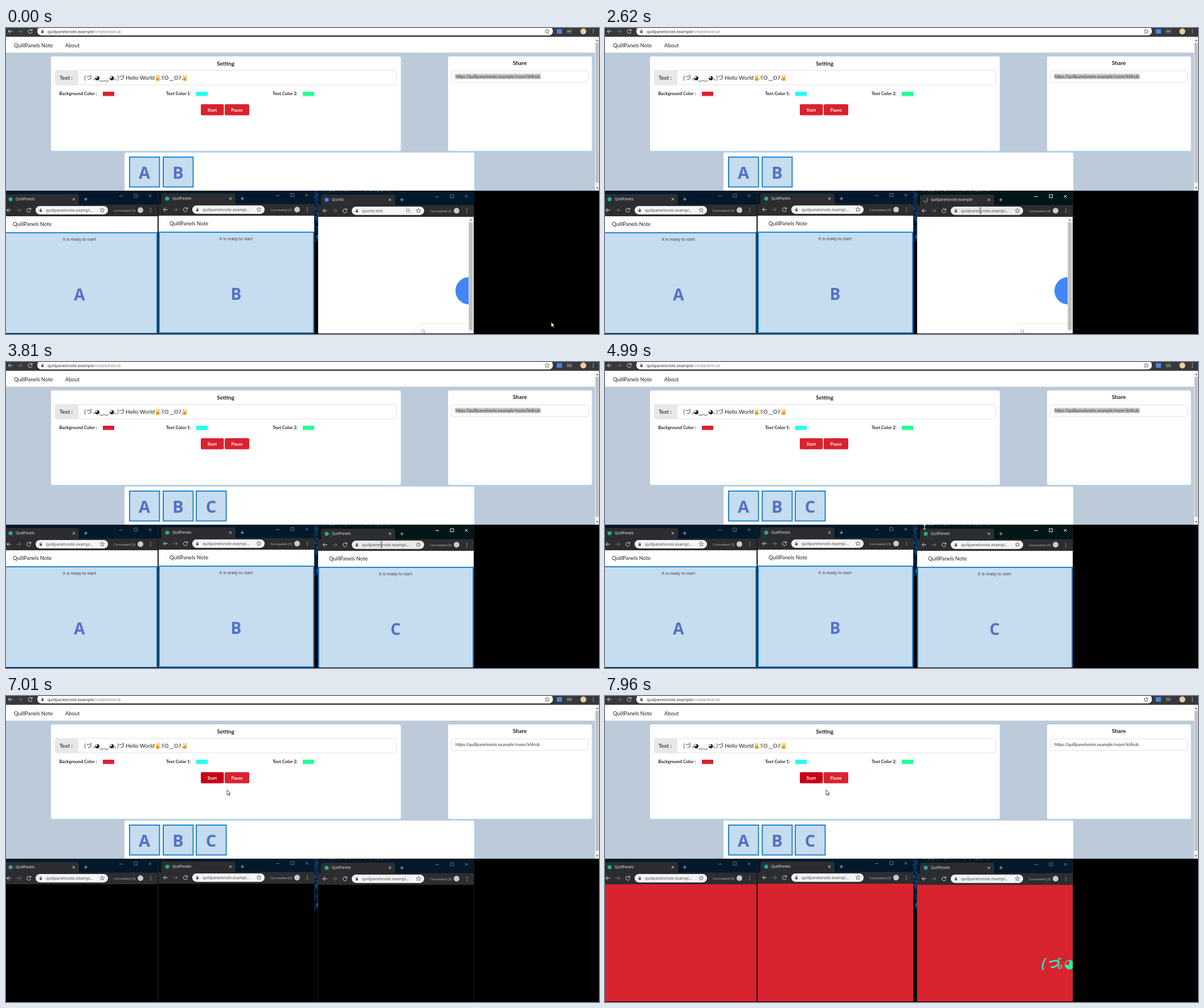
An HTML page that plays this animation: 1041 by 538 pixels, repeating every 8 s.

```html
<!DOCTYPE html>
<html lang="en">
<head>
<meta charset="utf-8">
<title>Text across screens</title>
<style>
html, body { margin: 0; width: 100%; height: 100%; overflow: hidden; background: #000; }
svg { display: block; width: 100vw; height: 100vh; font-family: 'Open Sans', 'Noto Sans', sans-serif; }
text { white-space: pre; }
.l { font-family: Lato, sans-serif; }
.k { font-family: 'Noto Sans CJK JP', 'Noto Sans CJK', 'DejaVu Sans', sans-serif; }
.d { font-family: 'DejaVu Sans', sans-serif; }
.b { font-weight: 700; }
.m { text-anchor: middle; }
</style>
</head>
<body>
<svg id="stage" viewBox="0 0 1041 538" preserveAspectRatio="none"></svg>
<script>
const LOOP = 8000;
const BLUE = '#2185d0', PALE = '#c6dcef', PAGE = '#bccada', RED = '#d9232f', DARK = '#2c2d30';
const APP = 'QuillPanels', NAV = APP + ' Note', HOST = 'quillpanelsnote.example', SHORT = 'quillpanelsnote.exampl...';
const $ = id => document.getElementById(id);

const rect = (x, y, w, h, fill, more = '') =>
  `<rect x="${x}" y="${y}" width="${w}" height="${h}" fill="${fill}" ${more}/>`;
const circle = (x, y, r, fill, more = '') => `<circle cx="${x}" cy="${y}" r="${r}" fill="${fill}" ${more}/>`;
const text = (x, y, s, size, cls = '', fill = '#222', more = '') =>
  `<text x="${x}" y="${y}" font-size="${size}" class="${cls}" fill="${fill}" ${more}>${s}</text>`;
const line = (x, y, d, color, w = 1, more = '') =>
  `<path transform="translate(${x} ${y})" d="${d}" fill="none" stroke="${color}" stroke-width="${w}" ${more}/>`;
const group = (id, body, more = '') => `<g id="${id}" ${more}>${body}</g>`;
const clip = (id, body) => `<g clip-path="url(#${id})">${body}</g>`;

const icons = {
  back: 'M4 0H-3.5M0-3.5L-3.5 0 0 3.5',
  next: 'M-4 0H3.5M0-3.5L3.5 0 0 3.5',
  reload: 'M2.8-2A3.5 3.5 0 1 0 3.4 1M3.5-4V-1.2H.7',
  star: 'M0-4L1.1-1.2 4-1.1 1.8.8 2.5 3.6 0 2-2.5 3.6-1.8.8-4-1.1-1.1-1.2Z',
  close: 'M-2.2-2.2L2.2 2.2M2.2-2.2L-2.2 2.2',
  plus: 'M-3 0H3M0-3V3',
  lens: 'M1.5 1.5L4 4M2-.5A2.6 2.6 0 1 1-3.2-.5A2.6 2.6 0 1 1 2-.5'
};
const lock = (x, y, c) => rect(x - 2, y - .8, 4, 3.6, c) + line(x, y, 'M-1.3-.5V-1.7A1.3 1.3 0 0 1 1.3-1.7V-.5', c, .8);
const dots = (x, y, c) => [-3, 0, 3].map(d => circle(x, y + d, .8, c)).join('');
const nav = (x, y) => line(x, y, icons.back, '#ddd') + line(x + 17.5, y, icons.next, '#77787b') +
  line(x + 35, y, icons.reload, '#ddd');
const card = (x, y, w, h) => rect(x, y, w, h, '#b0d3ef', 'rx="3" transform="translate(2 2)"') + rect(x, y, w, h, '#fff', 'rx="3"');

function tile(i) {
  const x = Math.round(217 + i * 58.6);
  return group('tile' + i, rect(x, 227, 52.5, 52.5, PALE, `stroke="${BLUE}" stroke-width="2"`) +
    text(x + 26, 265, 'ABC'[i], 29, 'b m', '#5470c4'));
}

function swatch(x, color) {
  return rect(x - 3, 109.5, 26, 12, '#fff', 'stroke="#e6e6e6" stroke-width=".7"') + rect(x, 112, 20, 7.5, color);
}

// Two raised fingers over a round palm.
const victory = x => line(x + 4.3, 89, 'M-1 0L-2-5.5M1 0L2.2-5.5', '#f2b235', 1.8, 'stroke-linecap="round"') +
  rect(x + 1, 87, 6.8, 6, '#f2b235', 'rx="2.6"') + line(x + 4.3, 89, 'M-2 .5H1.5M-2 2H1', '#a5701c', .6);

function message() {
  return text('137 141 153 156 164 172.5 181.5 190 195 198', 91, '(づ｡◕‿‿◕｡)づ', 10, 'k') +
    text(210, 91, 'Hello World', 9.7, 'l') + victory(262) +
    text('270.5 273 278 287 295 303 308', 91, '.ʕʘ‿ʘʔ.', 9.5, 'd') + victory(309.5);
}

function controlPage() {
  return rect(0, 0, 1041, 286, PAGE) +
    rect(0, 0, 1041, 16, '#37383b') + rect(55, -2, 905, 15, '#fff', 'rx="7"') +
    nav(7.5, 6) + lock(64, 6, '#555') +
    text(73, 8.7, `${HOST}<tspan fill="#777">/create/kt4rub</tspan>`, 7.1, '', '#222') +
    line(950, 6, icons.star, '#555', .8) + rect(967, 2, 9, 8, '#4a86e0') +
    rect(984, 2, 10, 8, '#505155', 'rx="1"') + [986.5, 989, 991.5].map(x => circle(x, 6, .8, '#eee')).join('') +
    circle(1013.5, 6, 5.2, '#e8cfa0') + dots(1031, 6, '#ddd') +
    rect(0, 15.5, 1034, 28, '#fff') + rect(0, 43, 1034, .7, '#d5d8dc') +
    text(14, 34, NAV, 9.3, 'l') + text(104, 34, 'About', 9.3, 'l') +
    rect(1034, 15.5, 7, 271, '#f1f1f1') + rect(1035, 26, 5.5, 246, '#c1c1c1') +
    '<path d="M1036 23h4l-2-2.5zM1036 280h4l-2 2.5z" fill="#505050"/>' +
    card(79, 50, 614, 166) + card(776, 50, 252.5, 166) + card(208, 219, 614, 80) +
    text(385.5, 66, 'Setting', 9.8, 'l b m') +
    rect(86.5, 74.5, 599, 25.5, '#fff', 'rx="2.5" stroke="#d9dadb" stroke-width=".8"') +
    rect(86, 74, 41, 26.5, '#e8e8e8', 'rx="2.5"') + text(94, 91, 'Text :', 9.6, 'l b', '#444') + message() +
    text(93.5, 117.5, 'Background Color :', 7.8, 'l b') + swatch(170, RED) +
    text(281, 117.5, 'Text Color 1:', 7.8, 'l b') + swatch(334, '#22fff0') +
    text(468, 117.5, 'Text Color 2:', 7.8, 'l b') + swatch(521, '#22ff99') +
    rect(342, 134, 40.5, 19.5, RED, 'rx="2.2" id="start"') + rect(384, 134, 43, 19.5, RED, 'rx="2.2"') +
    text(362, 146.7, 'Start', 7.6, 'l b m', '#fff') + text(405.5, 146.7, 'Pause', 7.6, 'l b m', '#fff') +
    text(902, 65, 'Share', 9.8, 'l b m') +
    rect(781.5, 75.5, 241, 20, '#fff', 'rx="2.5" stroke="#d9dadb" stroke-width=".8"') +
    rect(789, 80.5, 150, 9.5, '#c8c8c8', 'id="picked"') +
    text(789, 88, `https://${HOST}/room/kt4rub`, 7.5, 'l', '#333') +
    [0, 1, 2].map(tile).join('');
}

// Browser window; its coordinates are those of the leftmost one.
function browser(i, dx, dy, pages, extra = '') {
  const full = color => rect(-7, 331, 273, 210, color);
  const header = rect(-7, 331, 273, 27.5, '#fff') + text(12, 347.5, NAV, 9.3, 'l');
  const ready = header + rect(-6, 360, 271, 177, PALE, `stroke="${BLUE}" stroke-width="2"`) +
    text(129, 373.5, 'It is ready to start', 7.2, 'm', '#333') +
    text(129, 479, 'ABC'[i], 28, 'b m', '#5470c4');
  return `<g transform="translate(${dx} ${dy})">` +
    rect(-7, 287, 273, 260, '#000', 'stroke="#3a4148" stroke-width=".8"') +
    rect(-7, 287, 273, 25, '#03192b', `id="bar${i}"`) +
    group('buttons' + i, line(202, 295, 'M-3 .5H3', 'inherit') + rect(225, 292, 5.5, 5.5, 'none') +
      line(253, 295, icons.close, 'inherit'), 'stroke="#6e7b86" stroke-width=".9"') +
    rect(-2, 292, 130, 24, DARK, 'rx="4"') + rect(-7, 310.5, 273, 20.5, DARK) +
    circle(8, 301, 3.6, '#25a99b', `id="fav${i}"`) + text(17, 303.3, APP, 6.4, '', '#f0f0f0', `id="title${i}"`) +
    line(119, 301, icons.close, '#ddd', .9) + line(140, 301, icons.plus, '#ccc', .9) +
    nav(5, 320.3) + rect(52, 313, 127, 14.7, '#f4f5f6', `rx="7.3" id="pill${i}"`) + lock(61, 320.5, '#555') +
    rect(69, 315, 10, 11, '#1a74cf', `id="sel${i}" display="none"`) +
    text(70, 323, SHORT, 7.1, '', '#444', `id="url${i}"`) + line(169, 320, icons.star, '#555', .8) +
    text(189, 322.7, 'Concealed (3)', 6.1, '', '#bbb') + circle(236, 320.3, 5, '#c9cacc') + dots(254, 320.3, '#ccc') +
    full('#fff') + (pages ? pages(header) : '') +
    group('ready' + i, ready) + group('black' + i, full('#000')) + group('red' + i, full(RED)) + extra + '</g>';
}

function visitorPages(header) {
  const bar = (y, w) => rect(9, y, w, 5.3, 'url(#bone)', 'rx="2.6"');
  const search = circle(258, 461, 24, '#4285f4') +
    rect(162, 519, 150, 32, '#fff', 'rx="15" stroke="#dcdfe3" stroke-width=".8"') +
    line(178, 532.5, icons.lens, '#8a8f94', .9) +
    rect(257, 331, 9, 210, '#f1f1f1') + rect(257.5, 341, 7, 189, '#c1c1c1') +
    '<path d="M259 337.5h4l-2-2.5z" fill="#666"/>';
  const loading = rect(-7, 331, 273, 210, PAGE) + header + card(.5, 365, 257.5, 70) +
    text(129, 375, 'Loading', 9.7, 'l b m') + bar(389, 192) + bar(405.3, 240) + bar(421.7, 240);
  return group('search', clip('pageClip', search)) + group('loading', loading);
}

function visitorExtra() {
  const row = (y, s, c) => circle(57, y - 2.5, 2.6, 'none', 'stroke="#777" stroke-width=".7"') +
    clip('urlClip', text(70, y, s, 7.1, '', c));
  const drop = rect(47, 310.5, 137, 75.5, '#fff', 'rx="7" stroke="#cfd1d4" stroke-width=".5"') + lock(61, 320.5, '#555') +
    clip('urlClip', text(161, 323, HOST + '/room/kt4rub', 7.1, '', '#222', 'text-anchor="end"')) +
    line(169, 320, icons.star, '#555', .8) + rect(47, 332, 137, 25, '#e8eaed') +
    row(347, HOST + '/room', '#1a67c9') + row(372, HOST, '#333');
  const marquee = text('-1 11 29.5 41', 477, '(づ｡◕', 21.5, 'k b', 'url(#ink)', 'font-style="italic"');
  return line(151, 320, icons.lens, '#555', .8, 'id="lens"') + group('drop', drop) +
    clip('pageClip', group('scroll', marquee));
}

// Specks of the wallpaper that show between the windows.
function wallpaper() {
  let seed = 7, out = rect(541, 286, 7, 92, 'url(#night)');
  const rnd = () => (seed = seed * 16807 % 2147483647) / 2147483647;
  for (let i = 0; i < 70; i++)
    out += rect(541 + rnd() * 6, 289 + rnd() * 86, 1, 1 + rnd() * 3, `hsl(208 80% ${15 + rnd() * 35}%)`);
  for (let i = 0; i < 60; i++)
    out += rect(555 + rnd() * 120, 286.5 + rnd(), 1.5, 1, `hsl(205 60% ${20 + rnd() * 35}%)`);
  return out;
}

const gradient = (id, more, a, b) =>
  `<linearGradient id="${id}" ${more}><stop stop-color="${a}"/><stop offset="1" stop-color="${b}"/></linearGradient>`;
const clipBox = (id, ...box) => `<clipPath id="${id}">${rect(...box, '#000')}</clipPath>`;
const pointers = {
  arrow: '<path d="M0 0V9L2.1 7.1 3.5 10.2 4.9 9.6 3.5 6.5H6.3Z" fill="#fff" stroke="#000" stroke-width=".7"/>',
  beam: line(0, 0, 'M-1.8-4.8H1.8M0-4.8V4.8M-1.8 4.8H1.8', '#222', .8),
  size: line(0, 0, 'M0-4V4M-2-2.5L0-4.7 2-2.5M-2 2.5L0 4.7 2 2.5', '#fff', 1),
  hand: '<path d="M0 0Q1.5-1 1.6 1V4L5.5 5V8L4.5 11H0L-2.8 6.5-1.6 6 0 7Z" fill="#fff" stroke="#000" stroke-width=".7"/>'
};

$('stage').innerHTML = '<defs>' +
  gradient('bone', '', '#dcdcdc', '#f1f1f1') +
  gradient('night', 'x2="0" y2="1"', '#06234a', '#000814') +
  gradient('ink', 'gradientUnits="userSpaceOnUse" x1="0" x2="60"', '#22f6e2', '#22ff99') +
  clipBox('urlClip', 70, 311, 92, 80) + clipBox('pageClip', -7, 331, 273, 210) +
  clipBox('topClip', 0, 0, 1041, 286) + '</defs>' +
  rect(0, 0, 1041, 538, '#000') + wallpaper() +
  browser(0, 0, 0) + browser(1, 275, -1) + browser(2, 555, 1, visitorPages, visitorExtra()) +
  rect(0, 537, 1041, 1, '#000') + clip('topClip', controlPage()) +
  group('pointer', Object.keys(pointers).map(k => group(k, pointers[k])).join(''));

const path = [
  [0, 957, 517, 'arrow'], [60, 957, 517, 'arrow'], [420, 690, 321, 'beam'], [1170, 690, 321, 'beam'],
  [1250, 659, 321, 'beam'], [3720, 659, 321, 'beam'], [3765, 660, 321, 'beam'], [3810, 659, 321, 'beam'],
  [4170, 659, 321, 'arrow'], [4680, 613, 344, 'arrow'], [4920, 613, 344, 'arrow'], [4990, 561, 290, 'size'],
  [5075, 561, 290, 'arrow'], [5130, 326, 142, 'arrow'], [5370, 326, 142, 'arrow'], [5600, 358, 146, 'hand'],
  [5850, 358, 146, 'arrow'], [6170, 423, 168, 'arrow'], [6250, 423, 168, 'arrow'], [6390, 389, 166, 'arrow'],
  [6550, 388, 165, 'arrow'], [LOOP, 388, 165, 'arrow']
];
const show = (id, on) => $(id).setAttribute('display', on ? 'inline' : 'none');
const set = (id, name, value) => $(id).setAttribute(name, value);

function movePointer(t) {
  const n = path.findIndex(p => p[0] > t);
  const [t0, x0, y0, kind] = path[n - 1], [t1, x1, y1] = path[n];
  const u = (t - t0) / (t1 - t0), e = u * u * (3 - 2 * u);
  set('pointer', 'transform', `translate(${x0 + (x1 - x0) * e} ${y0 + (y1 - y0) * e})`);
  for (const k in pointers) show(k, k === kind);
}

function draw(t) {
  const within = (a, b) => t >= a && t < b;
  const active = within(580, 5600), editing = within(580, 2540), waiting = within(2540, 3000);
  movePointer(t);

  set('bar2', 'fill', active ? '#031617' : '#03192b');
  set('buttons2', 'stroke', active ? '#fff' : '#6e7b86');
  set('pill2', 'fill', editing ? '#fff' : within(380, 4300) ? '#e9eaec' : '#f4f5f6');
  set('pill2', 'stroke', editing ? '#3b82d8' : 'none');
  $('title2').textContent = t < 2540 ? 'Quorbi' : waiting ? HOST : APP;
  set('fav2', 'fill', t < 2540 ? '#4285f4' : waiting ? 'none' : '#25a99b');
  set('fav2', 'stroke', waiting ? '#b0b4b8' : 'none');
  set('fav2', 'stroke-dasharray', '15 8');
  set('fav2', 'stroke-dashoffset', -t / 30);

  $('url2').textContent = t < 1560 ? 'quorbi.test' : t < 2540 ? 's://www.quorbi.test' : SHORT;
  const selected = within(580, 2020);
  set('url2', 'fill', selected ? '#fff' : '#444');
  show('sel2', selected);
  if (selected) set('sel2', 'width', $('url2').getComputedTextLength() + 1);
  show('lens', t < 2020);
  show('drop', within(2020, 2540));

  show('search', t < 2700);
  show('loading', within(3450, 3580));
  show('tile2', t >= 3580);
  show('picked', t < 5600);
  set('start', 'fill', t >= 5500 ? '#c8001b' : RED);

  for (let i = 0; i < 3; i++) {
    show('ready' + i, within(i === 2 ? 3580 : 0, 7010));
    show('black' + i, within(7010, 7150));
    show('red' + i, t >= 7150);
  }
  show('scroll', t >= 7150);
  set('scroll', 'transform', `translate(${266 - (t - 7150) * .0691} 0)`);
}

function tick() {
  draw(performance.now() % LOOP);
  requestAnimationFrame(tick);
}
tick();
</script>
</body>
</html>
```
